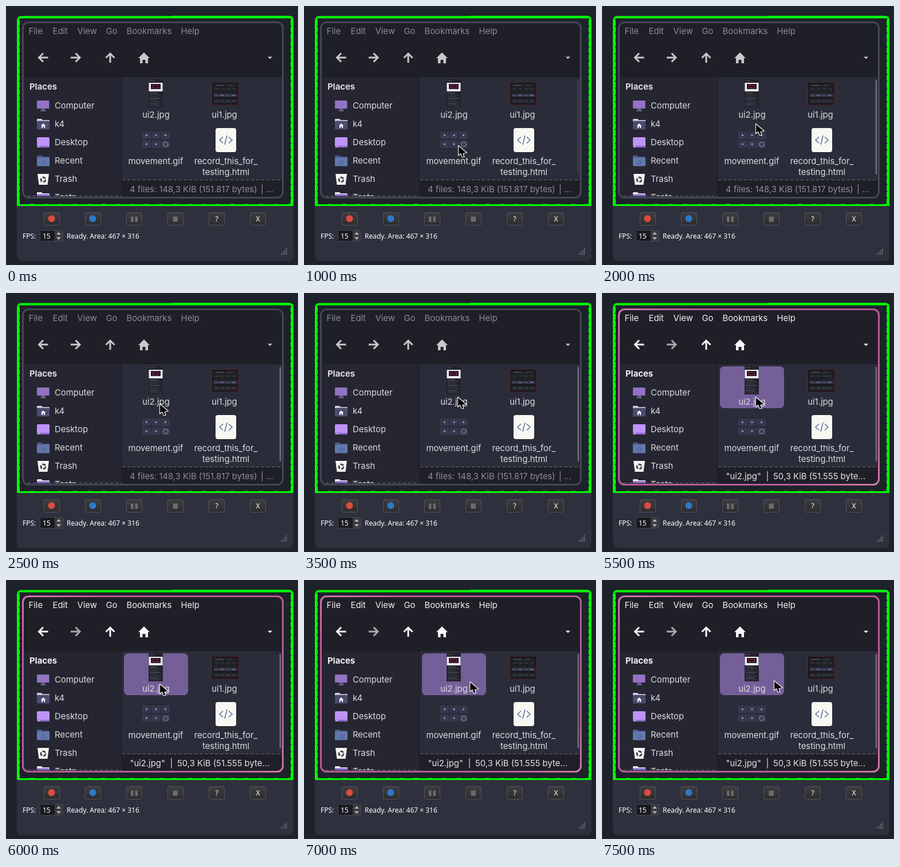
Write an HTML page that moves like this. It is 510 by 452 pixels and loops after 8000 ms.

```html
<!DOCTYPE html>
<html>
<head>
<meta charset="utf-8">
<style>
html, body { margin: 0; width: 100%; height: 100%; overflow: hidden; background: #1e222b }
svg { display: block }
text { font: 14.85px Inter, sans-serif; fill: #dcdce0; white-space: pre }
.mid text, text.mid { text-anchor: middle }
.small text { font: 12px "Noto Sans", "Open Sans", sans-serif; fill: #fff }
.menu text { fill: #8c8c95 }
.tools { color: #c9c9cb }
.forward { color: #c9c9cb }
#idle text { fill: #8e8e96 }
#picked text { fill: #e4e4e8 }
#picked, #glow, #select { display: none }
.active #idle { display: none }
.active #picked, .active #glow, .active #select { display: inline }
.active .menu text, .active .head { fill: #f2f2f4 }
.active .tools { color: #f6f6f6 }
.active .forward { color: #a9a9ac }
</style>
</head>
<body>
<svg id="stage" width="510" height="452" viewBox="0 0 510 452">
  <defs>
    <linearGradient id="pink" x2="1" y2="1">
      <stop stop-color="#cf76a8"/><stop offset=".15" stop-color="#b85b94"/>
      <stop offset=".85" stop-color="#b85b94"/><stop offset="1" stop-color="#cf76a8"/>
    </linearGradient>
    <linearGradient id="face" x2="0" y2="1">
      <stop stop-color="#3d3d40"/><stop offset="1" stop-color="#2d2d30"/>
    </linearGradient>
    <clipPath id="side"><rect x="31" y="124" width="170" height="208"/></clipPath>
    <clipPath id="win"><rect x="29" y="28" width="455" height="307" rx="10"/></clipPath>
    <path id="arrow" d="M9.500 0H-6M1-7.500L-6.500 0L1 7.500" fill="none" stroke="currentColor" stroke-width="3"/>
  </defs>

  <!-- recorder window and its capture frame -->
  <rect x="19" y="18" width="483" height="427" rx="8" fill="#2f303e"/>
  <path d="M19 349V26Q19 17.500 27 17.500H290V17H494Q502 17 502 25V349Z" fill="#0f0"/>
  <rect x="24" y="21.500" width="473" height="324" fill="#1e222b"/>
  <path d="M23.500 22V345M497.500 22V345" stroke="#1e222b" stroke-dasharray="3 9"/>
  <path d="M24 345.500H497" stroke="#1e222b" stroke-dasharray="18 7"/>

  <!-- file manager -->
  <g clip-path="url(#win)">
    <path d="M29 28H485V336H29Z" fill="#1f1f28"/>
    <path d="M31 124H201V334H31Z" fill="#252631"/>
    <path d="M202 124H484V304H202Z" fill="#2b2c39"/>
    <path d="M31 123.500H484M201.500 124V333" stroke="#1a1a22"/>
  </g>
  <path d="M38 331.500H202M203 303.500H481" stroke="#6b6c75" stroke-dasharray="5 4"/>
  <rect x="29.500" y="28.500" width="454" height="306" rx="10" fill="none" stroke="#434755" stroke-width="3"/>
  <rect id="glow" x="29.500" y="28.500" width="454" height="306" rx="10" fill="none" stroke="url(#pink)" stroke-width="3"/>

  <g class="menu" id="menu"></g>
  <g class="tools">
    <use href="#arrow" x="64" y="90"/>
    <use href="#arrow" class="forward" transform="translate(122.500 90) scale(-1 1)"/>
    <use href="#arrow" transform="translate(182 89.500) rotate(90)"/>
    <path d="M241 81L251 91H248V100H243.500V94H238.500V100H234V91H231Z" fill="currentColor"/>
    <path d="M457 88.500H465L461 92.500Z" fill="currentColor"/>
  </g>

  <text class="head" x="41" y="146" style="font-weight:700">Places</text>
  <g id="places" clip-path="url(#side)"></g>

  <rect id="select" x="206" y="128" width="112" height="73" rx="7" fill="#745f99"/>
  <g id="thumbs"></g>
  <g class="mid">
    <text x="262" y="195">ui2.jpg</text>
    <text x="381.500" y="195">ui1.jpg</text>
    <text x="261.500" y="276">movement.gif</text>
    <text x="384" y="276">record_this_for_</text>
    <text x="384" y="295">testing.html</text>
  </g>
  <rect id="bar" x="477.800" y="129" width="2.400" height="165" rx="1.200" fill="#73747d"/>
  <g id="idle">
    <text x="216" y="325">4 files: 148,3 KiB (151.817 bytes)</text>
    <text x="445" y="325">|</text><text x="454" y="325">...</text>
  </g>
  <g id="picked">
    <text x="216.500" y="325">"ui2.jpg"</text>
    <text x="286.500" y="325">|</text><text x="299" y="325">50,3 KiB (51.555 byte...</text>
  </g>

  <!-- recorder controls -->
  <g id="buttons"></g>
  <g class="small">
    <circle cx="79.500" cy="371" r="6" fill="#e0493f"/>
    <circle cx="151.500" cy="371" r="6" fill="#2f78c8"/>
    <path d="M218 367.500H222.500V377H218ZM225.500 367.500H230V377H225.500ZM291.500 367.500H300V376.500H291.500Z" fill="#6c6c6f"/>
    <text class="mid" x="368" y="376">?</text>
    <text class="mid" x="440" y="376">X</text>
    <text x="29" y="405.500">FPS:</text>
    <rect x="59.500" y="391.500" width="40" height="19" rx="2" fill="#191a20" stroke="#45464e"/>
    <path d="M85 392H99V410H85Z" fill="#3a3a40"/>
    <path d="M88 399L92 394.500L96 399ZM88 403.500L92 408L96 403.500Z" fill="#b4b4b8"/>
    <text x="64" y="405.500">15</text>
    <text x="106" y="405.500">Ready. Area: 467 × 316</text>
  </g>
  <g id="grip"></g>

  <path id="cursor" d="M.5.5V18L4.500 14.500L7 20.500H11L9 14.500L15.500 13Z" fill="#000" stroke="#fff" stroke-width="1.1" stroke-linejoin="round"/>
</svg>
<script>
const $ = id => document.getElementById(id);
const box = (x, y, w, h, fill, extra = '') =>
  `<rect x="${x}" y="${y}" width="${w}" height="${h}" fill="${fill}" ${extra}/>`;
const label = (x, y, s) => `<text x="${x}" y="${y}">${s}</text>`;
const path = (d, fill) => `<path d="${d}" fill="${fill}"/>`;

$('menu').innerHTML = [[39, 'File'], [81, 'Edit'], [124, 'View'], [174, 'Go'], [210, 'Bookmarks'], [305, 'Help']]
  .map(([x, s]) => label(x + .5, 49, s)).join('');

const folder = (y, back, front, mark = '') =>
  path(`M54 ${y - 8}q0-1 1-1h7l2 2h11q1 0 1 1v13H54Z`, back) +
  box(54, y - 5.5, 22, 15, front, 'rx="1.5"') + mark;
const icons = [
  y => box(54, y - 9, 21.5, 14, '#9273c4', 'rx="1"') + path(`M62 ${y + 5}h6l2 5h-10Z`, '#625a7c'),
  y => folder(y, '#d9d0ee', '#4d4c70', path(`M65 ${y - 1}l4 4h-1v4h-2v-3h-2v3h-2v-4h-1Z`, '#fff')),
  y => box(54, y - 9, 22, 18, '#bd93f9', 'rx="2"') + box(54, y + 6, 22, 3, '#8b68c9') + box(56, y + 7, 3, 1, '#eee'),
  y => folder(y, '#4a5a88', '#6277ad',
    `<circle cx="65" cy="${y + 3}" r="3" fill="none" stroke="#4a5a8a"/>`),
  y => path(`M55 ${y - 9}h20l-2.500 19h-15Z`, '#f4f4f0') +
    `<circle cx="65" cy="${y + 1}" r="4" fill="none" stroke="#343746" stroke-width="2.6" stroke-dasharray="6 2.4"/>`,
  y => folder(y, '#ece9f5', '#8c68c8')
];
$('places').innerHTML = ['Computer', 'k4', 'Desktop', 'Recent', 'Trash', 'Tests']
  .map((s, i) => icons[i](174 + 32 * i) + label(85, 179 + 32 * i, s)).join('');

// file previews
let art = box(249, 128, 25, 49, '#22232c') + box(250, 130, 9, 1, '#555') +
  box(249.5, 134, 24, 15, '#f0eef2') + box(253, 136, 17, 9, '#1c1420') +
  box(256, 138, 11, 5, '#2a1522', 'stroke="#8f2856"');
for (let i = 0; i < 8; i++)
  art += box(251, 151 + i * 3.2, 13 + i * 5 % 9, 1.4, i % 3 ? '#383944' : '#4d4f5c');
art += box(358.5, 133.5, 47, 39, '#17171c', 'stroke="#4a1c22"') + box(358, 134, 2, 38, '#651a20') +
  box(362, 136, 41, 18, '#202127') + box(366, 138, 14, 1, '#666') + box(386, 138, 10, 1, '#4a4a50') +
  box(362, 153, 42, 6, '#2f3042') + box(362, 162, 42, 8, '#25262d');
for (let i = 0; i < 4; i++)
  art += box(365 + i * 10, 144, 7, 2, '#33343b') + box(364 + i * 10, 155, 7, 2, i % 2 ? '#62648a' : '#4a4b60') +
    box(365 + i * 10, 165, 6, 1.5, '#43444c');
for (let i = 0; i < 6; i++) {
  const x = 238 + i % 3 * 16.5, y = 219.5 + (i / 3 | 0) * 15.5;
  art += box(x, y, 15, 12.5, '#36384f') +
    (i == 5 ? `<circle cx="${x + 8}" cy="${y + 6.5}" r="4" fill="none" stroke="#80839a" stroke-width="2" stroke-dasharray="2 1"/>`
      : `<circle cx="${x + 7.5}" cy="${y + 6}" r="1.5" fill="#a4a6b4"/>`);
}
art += box(366, 213, 36, 42, '#f8f8f2', 'rx="4"') +
  '<path d="M379 228.500l-6 5.500l6 5.500M389 228.500l6 5.500l-6 5.500M386 226l-4 16" fill="none" stroke="#5c6d9d" stroke-width="1.5"/>';
$('thumbs').innerHTML = art;

for (let i = 0; i < 6; i++)
  $('buttons').innerHTML += box(66.5 + i * 72, 360.5, 27, 22, 'url(#face)', 'rx="2" stroke="#54545a"');
for (let r = 0; r < 4; r++)
  for (let c = 3 - r; c < 4; c++)
    $('grip').innerHTML += box(480 + c * 3, 423 + r * 3, 1.6, 1.6, '#8b8c96');

// pointer path: [step, x, y], one step per half second
const stops = [[2, 269, 243], [4, 268, 205], [6, 268, 181], [12, 268, 181], [15, 300, 175]];

function pointer(step) {
  const i = Math.max(1, stops.findIndex(s => s[0] >= step));
  const [a, ax, ay] = stops[i - 1], [b, bx, by] = stops[i];
  const k = (step - a) / (b - a);
  return [ax + (bx - ax) * k, ay + (by - ay) * k];
}

function draw(now) {
  const step = Math.floor(now % 8000 / 500);
  const inside = step > 1;
  $('stage').classList.toggle('active', step > 10);
  $('cursor').style.display = inside ? '' : 'none';
  if (inside) $('cursor').setAttribute('transform', `translate(${pointer(step)})`);
  $('bar').style.opacity = inside ? (step == 2 ? .3 : 1) : 0;
  requestAnimationFrame(draw);
}
draw(performance.now());
</script>
</body>
</html>
```
